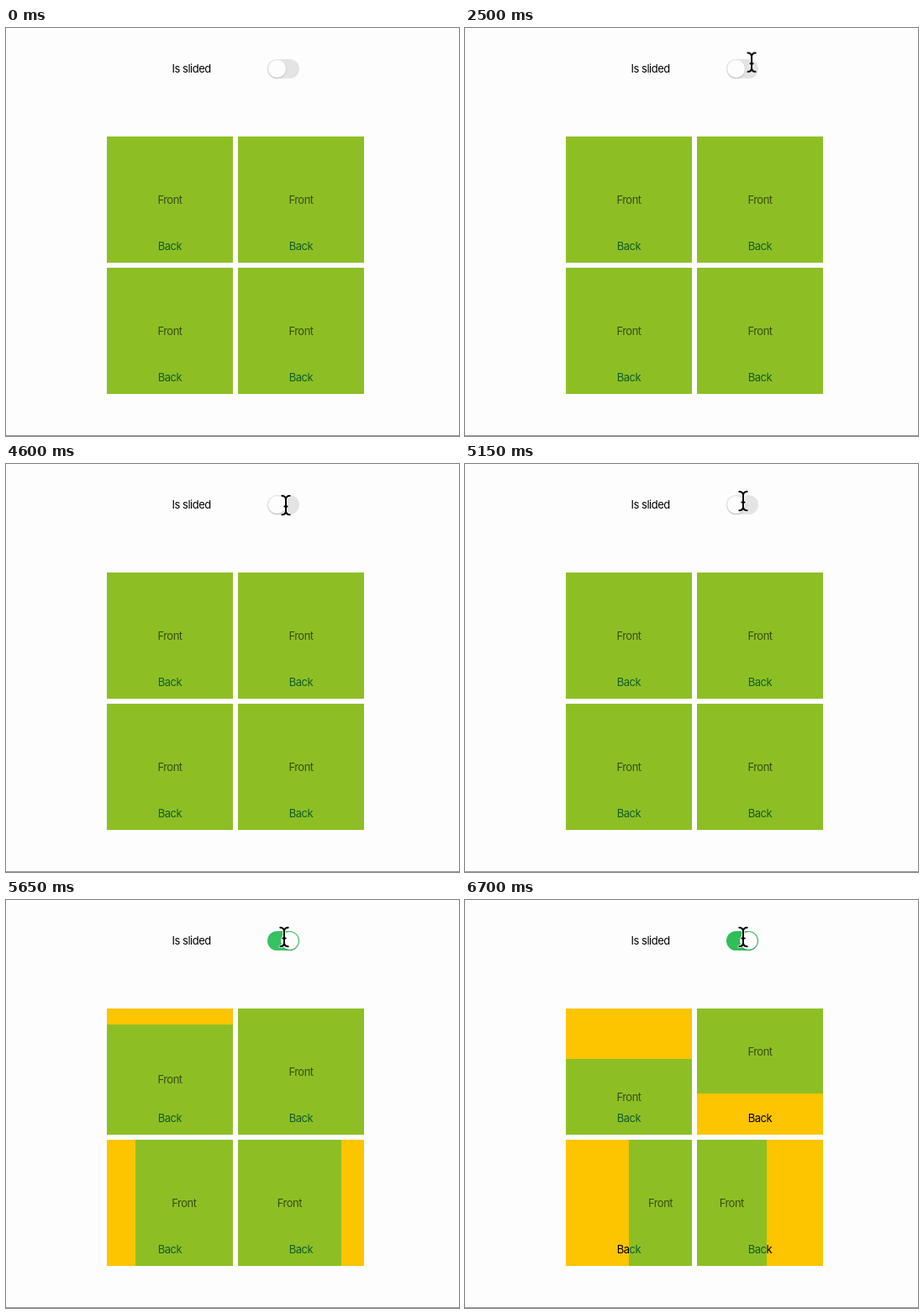
An HTML page that plays this animation: 539 px wide and 485 px high, repeating every 8000 ms.

```html
<!DOCTYPE html>
<html lang="en">
<head>
<meta charset="utf-8">
<title>Slide toggle</title>
<style>
  html, body { margin: 0; width: 100%; height: 100%; overflow: hidden; background: #fdfdfd; }
  .stage {
    position: relative; width: 539px; height: 485px; overflow: hidden;
    font: 13px/16px Inter, "Open Sans", sans-serif; letter-spacing: -.038em; color: #000;
  }
  .stage * { position: absolute; }
  .rule { left: 0; right: 0; bottom: 0; height: 1px; background: #959595; }
  .title { left: 197.5px; top: 40px; white-space: nowrap; }

  /* One 8 s timeline: 1% = 80 ms */
  .track, .knob, .front, .cursor { animation: 8s linear infinite; }

  .track {
    left: 311px; top: 37px; width: 38px; height: 23px; border-radius: 12px;
    background: #e4e4e4; animation-name: track;
  }
  .knob {
    left: 1.2px; top: 1.2px; width: 20.6px; height: 20.6px; border-radius: 50%;
    background: #fdfdfd; box-shadow: 0 1px 2px #0003; animation-name: knob;
  }
  @keyframes track {
    0%, 65.6% { background: #e4e4e4; animation-timing-function: ease-out; }
    69.4% { background: #3fc66b; }
    72%, 100% { background: #2fbe57; }
  }
  @keyframes knob {
    0%, 65.6% { transform: none; animation-timing-function: ease-in-out; }
    68.6%, 100% { transform: translateX(15px); }
  }

  .tile { width: 150px; height: 150px; background: #fdc400; overflow: hidden; }
  .west { left: 120px; }
  .east { left: 276px; }
  .north { top: 129px; }
  .south { top: 285px; }
  .back { left: 0; right: 0; bottom: 12px; text-align: center; }
  .front {
    inset: 0; display: flex; align-items: center; justify-content: center;
    background: rgb(30 188 74 / .5); color: rgb(0 0 0 / .6);
  }
  .down { animation-name: down; }
  .up { animation-name: up; }
  .right { animation-name: right; }
  .left { animation-name: left; }
  @keyframes down {
    0%, 66.2% { top: 0; animation-timing-function: ease-in-out; }
    77.6%, 100% { top: 60px; }
  }
  @keyframes up {
    0%, 72% { bottom: 0; animation-timing-function: ease-in-out; }
    77.5%, 100% { bottom: 49px; }
  }
  @keyframes right {
    0%, 66.3% { left: 0; animation-timing-function: ease-in-out; }
    75.5%, 100% { left: 75px; }
  }
  @keyframes left {
    0%, 65.3% { right: 0; animation-timing-function: ease-in-out; }
    77.3%, 100% { right: 67.5px; }
  }

  .cursor {
    left: 0; top: 0; width: 1px; height: 1px; overflow: visible; animation-name: cursor;
    fill: none; stroke-linecap: round; stroke-linejoin: round;
  }
  .halo { stroke: #fff; stroke-width: 3.6; }
  .ink { stroke: #000; stroke-width: 2; }
  @keyframes cursor {
    0%, 21.87% { transform: translate(343px, -30px); }
    21.875% { transform: translate(343px, -2px); animation-timing-function: ease-out; }
    31.9%, 32.5% { transform: translate(341px, 41px); animation-timing-function: ease-in-out; }
    38.1%, 41.2% { transform: translate(341px, 52px); animation-timing-function: ease-in-out; }
    48.1%, 57.5% { transform: translate(333px, 49px); animation-timing-function: ease-out; }
    61%, 100% { transform: translate(331px, 44px); }
  }
</style>
</head>
<body>
<div class="stage">
  <div class="title">Is slided</div>
  <div class="track"><div class="knob"></div></div>

  <div class="tile north west"><div class="back">Back</div><div class="front down">Front</div></div>
  <div class="tile north east"><div class="back">Back</div><div class="front up">Front</div></div>
  <div class="tile south west"><div class="back">Back</div><div class="front right">Front</div></div>
  <div class="tile south east"><div class="back">Back</div><div class="front left">Front</div></div>

  <svg class="cursor">
    <defs>
      <path id="beam" d="M-4.7-11.3Q-.8-11.3 0-7.5Q.8-11.3 4.7-11.3M0-7.5V7.5M-4.7 11.3Q-.8 11.3 0 7.5Q.8 11.3 4.7 11.3M-1.7 1.5H1.7"/>
    </defs>
    <use href="#beam" class="halo"/>
    <use href="#beam" class="ink"/>
  </svg>
  <div class="rule"></div>
</div>
</body>
</html>
```
